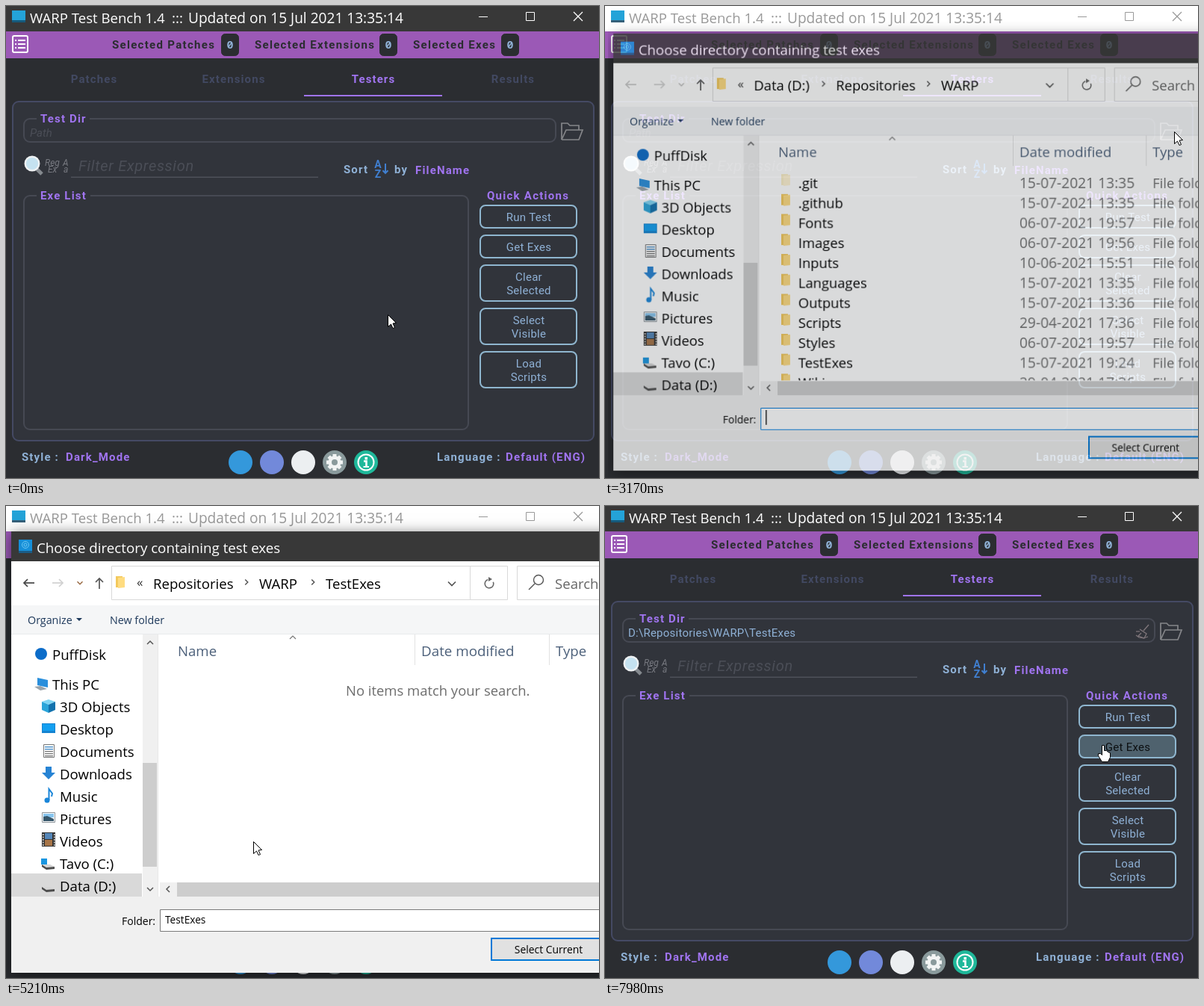
Animation, 794 px wide and 632 px high, one loop 8000 ms. Source, as an HTML page with a canvas:

```html
<!DOCTYPE html>
<html lang="en">
<head>
<meta charset="utf-8">
<title>Test bench</title>
<style>
html, body { margin: 0; width: 100%; height: 100%; overflow: hidden; background: #2b2d31; }
canvas { display: block; }
</style>
</head>
<body>
<canvas id="stage" width="794" height="632"></canvas>
<script>
const stage = document.getElementById('stage').getContext('2d');
const sheet = document.createElement('canvas');
sheet.width = 900;
sheet.height = 680;
const sheetCtx = sheet.getContext('2d');
let ctx = stage;

const LOOP = 8000, FIRST = 1130, STEP = 126.85;
const PURPLE = '#a074f0', BLUE = '#8fb1d6', EDGE = '#464953', PANEL = '#31343b', BODY = '#2b2d31';
const ACCENT = '#0078d7', GREY = '#cdcdcd';

// ---- drawing helpers; text is placed by the middle of its capitals ----
function text(s, x, y, color, font, size, spacing = 0, align = 'left') {
  ctx.font = font.replace('#', size + 'px');
  ctx.letterSpacing = spacing + 'px';
  ctx.textAlign = align;
  ctx.fillStyle = color;
  ctx.fillText(s, x, y + size * 0.36);
}
const ui = (s, x, y, color = '#000', size = 18.6, align) =>
  text(s, x, y, color, '# "Open Sans", sans-serif', size, 0, align);
const bold = (s, x, y, color = PURPLE, spacing = 1.15, align) =>
  text(s, x, y, color, 'bold # Roboto, sans-serif', 15, spacing, align);
const plain = (s, x, y, color = BLUE, align) =>
  text(s, x, y, color, '# Roboto, sans-serif', 15, 0.25, align);
const italic = (s, x, y, color, size, spacing = 0) =>
  text(s, x, y, color, 'italic # Roboto, sans-serif', size, spacing);

function rect(x, y, w, h, fill) {
  ctx.fillStyle = fill;
  ctx.fillRect(x, y, w, h);
}
function box(x, y, w, h, stroke, width = 1, radius = 0, fill) {
  ctx.beginPath();
  ctx.roundRect(x + width / 2, y + width / 2, w - width, h - width, radius);
  if (fill) { ctx.fillStyle = fill; ctx.fill(); }
  ctx.strokeStyle = stroke;
  ctx.lineWidth = width;
  ctx.stroke();
}
function trace(points) {
  ctx.beginPath();
  for (let i = 0; i < points.length; i += 2) ctx.lineTo(points[i], points[i + 1]);
}
function line(color, width, ...points) {
  trace(points);
  ctx.strokeStyle = color;
  ctx.lineWidth = width;
  ctx.stroke();
}
function shape(fill, ...points) {
  trace(points);
  ctx.closePath();
  ctx.fillStyle = fill;
  ctx.fill();
}
function disc(x, y, r, fill) {
  ctx.beginPath();
  ctx.arc(x, y, r, 0, 7);
  ctx.fillStyle = fill;
  ctx.fill();
}
function ring(x, y, r, color, width, from = 0, to = 7) {
  ctx.beginPath();
  ctx.arc(x, y, r, from, to);
  ctx.strokeStyle = color;
  ctx.lineWidth = width;
  ctx.stroke();
}
// Chevron pointing along (dx, dy)
function chevron(x, y, dx, dy, color, r = 4, width = 1.5) {
  line(color, width, x - dx * r / 2 - dy * r, y - dy * r / 2 - dx * r, x + dx * r / 2, y + dy * r / 2,
    x - dx * r / 2 + dy * r, y - dy * r / 2 + dx * r);
}
function arrow(x, y, dx, dy, color) {
  line(color, 1.7, x - dx * 7, y - dy * 7, x + dx * 7, y + dy * 7);
  chevron(x + dx * 4.5, y + dy * 4.5, dx, dy, color, 5, 1.7);
}

// ---- main window ----
const BUTTONS = [
  [266, 32, 'Run Test'], [306, 32, 'Get Exes'], [346, 50, 'Clear', 'Selected'],
  [404, 50, 'Select', 'Visible'], [462, 50, 'Load', 'Scripts']
];
const overButton = (p, [y, h]) => p.x >= 634 && p.x < 765 && p.y >= y && p.y < y + h;

function titleBar(active) {
  const ink = active ? '#fff' : '#999';
  rect(0, 0, 794, 34, active ? '#383838' : '#fff');
  rect(8, 6, 18, 13, '#24a3d8');
  rect(8, 19, 18, 3, active ? '#165a7c' : '#35607a');
  ui('WARP Test Bench 1.4', 32, 16, ink, 18.6);
  ui(':::', 222, 16, ink);
  ui('Updated on 15 Jul 2021 13:35:14', 244, 16, ink, 19.1);
  line(ink, 1, 633, 14.5, 645, 14.5);
  box(696, 8, 12, 12, ink);
  line(ink, 1.2, 760, 8, 772, 20);
  line(ink, 1.2, 772, 8, 760, 20);
}

function fieldset(x, y, w, h, legend, gap) {
  box(x, y, w, h, EDGE, 2, 8);
  rect(41, y - 1, gap, 4, PANEL);
  bold(legend, 46, y + 1);
}

function footerIcons() {
  ['#3498db', '#7289da', '#eceff1', '#8a9a9c', '#1fb89a'].forEach((c, i) => disc(314 + i * 42, 611, 16, c));
  for (let a = 0; a < 8; a++) {
    const c = Math.cos(a * Math.PI / 4), s = Math.sin(a * Math.PI / 4);
    line('#f2f4f4', 5, 440 + c * 6, 611 + s * 6, 440 + c * 11, 611 + s * 11);
  }
  disc(440, 611, 8.5, '#f2f4f4');
  disc(440, 611, 4, '#8a9a9c');
  ring(482, 611, 10.5, '#fff', 2);
  rect(480.5, 604, 3.5, 3.5, '#fff');
  line('#fff', 2.6, 479, 609.5, 482.5, 609.5, 482.5, 617);
  line('#fff', 2, 478.5, 617, 486, 617);
}

function mainWindow(active, filled, pointer) {
  rect(0, 0, 794, 632, BODY);
  titleBar(active);

  rect(0, 34, 794, 36, '#9b59b6');
  box(8, 39, 22, 24, '#fff', 2, 2);
  for (const y of [46, 51, 56]) {
    rect(12, y - 1, 2, 2, '#fff');
    rect(16, y - 1, 10, 2, '#fff');
  }
  [['Selected Patches', 142, 288], ['Selected Extensions', 333, 500], ['Selected Exes', 545, 663]]
    .forEach(([label, x, badge]) => {
      bold(label, x, 52, BODY, 1.3);
      box(badge, 37, 24, 30, BODY, 1, 5, BODY);
      text('0', badge + 12, 52, BLUE, 'bold # "Noto Sans Mono", monospace', 15, 0, 'center');
    });

  ['Patches', 'Extensions', 'Testers', 'Results'].forEach((tab, i) =>
    bold(tab, 118 + i * 187, 98, i === 2 ? PURPLE : '#424962', 1.1, 'center'));
  rect(399, 119, 185, 2, PURPLE);

  box(8, 127, 780, 456, '#454a64', 2, 8, PANEL);

  fieldset(23, 150, 714, 33, 'Test Dir', 71);
  if (filled) {
    plain('D:\\Repositories\\WARP\\TestExes', 31, 170);
    line('#80777c', 1.3, 728, 159, 721, 167);
    line('#80777c', 1.3, 716, 165, 725, 171, 722, 177, 714, 174, 718, 170);
    line('#80777c', 1.2, 711, 168, 716, 168);
    line('#80777c', 1.2, 711, 173, 715, 176, 721, 177, 727, 175);
  } else {
    italic('Path', 32, 170, '#4b4e57', 15);
  }
  line('#85868a', 1.7, 744, 179, 744, 157, 752, 157, 755, 160, 767, 160, 767, 166);
  line('#85868a', 1.7, 744, 179, 750, 166, 772, 166, 767, 179, 744, 179);

  line('#858a8f', 5, 40, 217, 48, 225);
  disc(35, 211, 10.5, '#eef1f3');
  disc(35, 211, 8, '#c5e2f0');
  const dim = '#777980';
  italic('Reg', 52, 210, dim, 12);
  italic('Ex', 56, 219, dim, 12);
  italic('A', 76, 210, dim, 12);
  italic('a', 77, 219, dim, 12);
  italic('Filter Expression', 97, 214, '#4b4e57', 20, 0.7);
  rect(87, 228.5, 331, 1.5, '#4e515a');

  bold('Sort', 452, 219, BLUE);
  const sort = '#407fd0';
  text('A', 498, 212, sort, 'bold # Roboto, sans-serif', 14, 0, 'center');
  text('Z', 498, 225, sort, 'bold # Roboto, sans-serif', 14, 0, 'center');
  line(sort, 2, 508, 211, 508, 223);
  chevron(508, 222, 0, 1, sort, 3.5, 2);
  bold('by', 520, 219, BLUE);
  bold('FileName', 548, 220);

  fieldset(23, 253, 597, 315, 'Exe List', 72);

  bold('Quick Actions', 644, 254, PURPLE, 1.25);
  for (const b of BUTTONS) {
    const [y, h, ...rows] = b, over = pointer && overButton(pointer, b);
    box(634, y, 131, h, '#8fb6cf', 2, 7, over ? '#4f626e' : PANEL);
    rows.forEach((row, i) =>
      plain(row, 700, y + h / 2 + 1 + (i - (rows.length - 1) / 2) * 18, over ? '#0d1012' : BLUE, 'center'));
  }

  bold('Style :', 21, 604, BLUE);
  bold('Dark_Mode', 80, 604);
  bold('Language :', 577, 604, BLUE);
  bold('Default (ENG)', 669, 604);
  footerIcons();
}

// ---- folder chooser ----
const FOLDERS = [
  ['.git', '15-07-2021 13:35'], ['.github', '15-07-2021 13:35'], ['Fonts', '06-07-2021 19:57'],
  ['Images', '06-07-2021 19:56'], ['Inputs', '10-06-2021 15:51'], ['Languages', '15-07-2021 13:35'],
  ['Outputs', '15-07-2021 13:36'], ['Scripts', '29-04-2021 17:36'], ['Styles', '06-07-2021 19:57'],
  ['TestExes', '15-07-2021 19:24'], ['Wiki', '29-04-2021 17:36']
];
function screenIcon(x, y) {
  rect(x, y, 18, 13, '#1583d0');
  rect(x + 1, y + 1, 16, 9, '#139ff0');
}
function driveIcon(y) {
  shape('#d5d5d5', 49, y + 1, 59, y + 1, 65, y + 4, 54, y + 5);
  shape('#4d4d4d', 48, y + 1, 54, y + 5, 65, y + 4, 65, y + 7, 54, y + 8, 48, y + 4);
}
const PLACES = [
  ['PuffDisk', y => disc(47, y - 1, 8, '#0b6cc9')],
  ['This PC', y => {
    shape('#2a8fdc', 42, y - 9, 56, y - 6, 56, y + 4, 42, y + 1);
    shape('#9aa4ab', 38, y + 3, 46, y + 2, 55, y + 6, 46, y + 8);
  }],
  ['3D Objects', y => {
    shape('#7fd6f5', 48, y - 7, 57, y - 10, 66, y - 7, 57, y - 3);
    shape('#2aa5da', 48, y - 7, 57, y - 3, 57, y + 8, 48, y + 4);
    shape('#1272ae', 66, y - 7, 57, y - 3, 57, y + 8, 66, y + 4);
  }],
  ['Desktop', y => screenIcon(48, y - 8)],
  ['Documents', y => {
    box(50, y - 10, 15, 18, '#777', 1, 0, '#fff');
    for (let i = 0; i < 5; i++) rect(52, y - 7 + i * 3, 11, 1.3, i < 2 ? '#3b86c4' : '#777');
  }],
  ['Downloads', y => {
    shape('#2683d4', 53, y - 10, 61, y - 10, 61, y - 2, 66, y - 2, 57, y + 7, 48, y - 2, 53, y - 2);
  }],
  ['Music', y => {
    disc(55, y + 5, 3.5, '#1a86d9');
    line('#1a86d9', 2, 57.5, y + 5, 57.5, y - 10, 62, y - 4, 61, y);
  }],
  ['Pictures', y => {
    box(48, y - 9, 18, 14, '#8b9399', 1, 0, '#fff');
    rect(50, y - 7, 14, 5, '#88c5ee');
    shape('#36566a', 50, y - 3, 55, y - 4, 64, y, 64, y + 3, 50, y + 3);
  }],
  ['Videos', y => {
    rect(48, y - 12, 18, 19, '#333');
    rect(52, y - 11, 10, 8, '#5486b8');
    rect(52, y - 2, 10, 8, '#a77548');
    for (let i = 0; i < 5; i++) for (const x of [49, 64]) rect(x, y - 10 + i * 3.5, 1.5, 2, '#ddd');
  }],
  ['Tavo (C:)', y => { driveIcon(y); rect(47, y - 7, 8, 8, '#1a96e0'); }],
  ['Data (D:)', driveIcon]
];

function folderIcon(x, y, pale) {
  rect(x, y, 9, 15, pale ? '#fbeec6' : '#f3c95c');
  shape(pale ? '#fff3d2' : '#ffdc80', x + 3, y + 2, x + 12, y + 1, x + 12, y + 15, x + 3, y + 16);
}

function addressBar(tick) {
  const inside = tick >= 27;
  arrow(31, 103, -1, 0, inside ? '#444' : '#c8c8c8');
  arrow(69, 103, 1, 0, '#d0d0d0');
  chevron(99, 103, 0, 1, inside ? '#9a6b45' : '#c0c0c0', 3.5);
  arrow(125, 104, 0, -1, '#555');
  box(141, 80, 481, 46, '#d9d9d9');
  box(621, 80, 51, 46, '#d9d9d9');
  box(684, 80, 176, 46, '#d9d9d9');
  folderIcon(147, 94);
  ui('«', 175, 102, '#333', 17);
  const crumbs = tick < 18
    ? [['Data (D:)', 197, 291], ['Repositories', 308, 433], ['WARP', 450]]
    : [['Repositories', 197, 322], ['WARP', 339, 411], ...(inside ? [['TestExes', 428]] : [])];
  for (const [name, x, next] of crumbs) {
    ui(name, x, 104);
    if (next) chevron(next, 102, 1, 0, '#555', 3.5);
  }
  chevron(597, 104, 0, 1, '#555', 5, 1.7);
  ring(647, 104, 5.8, '#666', 1.6, -0.4, 4.4);
  shape('#666', 646, 95, 651, 98, 646, 101);
  ring(713, 99, 6.5, '#555', 1.4);
  line('#555', 1.4, 708, 104, 700, 112);
  ui('Search TestExes', 735, 104, '#666');
}

function sidebar() {
  rect(7, 492, 175, 31, '#d9d9d9');
  PLACES.forEach(([name, icon], i) => {
    const y = 209 + i * 30 - (i ? 0 : 10);
    icon(y);
    ui(name, i < 2 ? 62 : 72, y);
  });
  rect(183, 172, 20, 351, '#f0f0f0');
  rect(183, 344, 19, 139, GREY);
  chevron(193, 183, 0, -1, '#555');
  chevron(193, 513, 0, 1, '#555');
  rect(203, 172, 1, 351, '#e8e8e8');
}

function fileList(tick) {
  const head = '#4c607a';
  chevron(384, 176, 0, -1, '#777', 4, 1.2);
  ui('Name', 230, 194, head);
  ui('Date modified', 556, 194, head, 18.8);
  ui('Type', 736, 194, head);
  rect(547, 172, 1, 41, '#e2e2e2');
  rect(727, 172, 1, 41, '#e2e2e2');
  if (tick >= 27) {
    if (tick >= 28) ui('No items match your search.', 455, 247, '#6d6d6d', 18.45);
  } else {
    ctx.save();
    ctx.beginPath();
    ctx.rect(205, 213, 690, 290);
    ctx.clip();
    if (tick === 24) rect(226, 409, 634, 28, '#e5f3ff');
    if (tick >= 25) rect(226, 465, 634, 27, '#cce8ff');
    FOLDERS.forEach(([name, date], i) => {
      const y = 236 + i * 27;
      folderIcon(234, y - 12, i === 0);
      ui(name, 257, y);
      ui(date, 556, y, '#6d6d6d', 19.4);
      ui('File folder', 736, y, '#6d6d6d');
    });
    ctx.restore();
  }
  rect(206, 504, 654, 19, '#f0f0f0');
  rect(229, 504, 600, 19, GREY);
  chevron(217, 513, -1, 0, '#555');
}

function chooser(tick) {
  ctx.clearRect(0, 0, 900, 680);
  ctx.shadowColor = 'rgba(0,0,0,.55)';
  ctx.shadowBlur = 18;
  ctx.shadowOffsetY = 3;
  rect(7, 34, 866, 591, '#f0f0f0');
  ctx.shadowColor = 'transparent';

  rect(7, 34, 866, 40, '#383838');
  rect(17, 45, 18, 15, '#168fd8');
  ring(26, 52, 4.5, '#6cc6f2', 1);
  ring(26, 52, 2, '#6cc6f2', 1);
  rect(17, 60, 18, 3, '#1b5d87');
  ui('Choose directory containing test exes', 41, 56, '#fff', 18.75);

  rect(7, 74, 866, 449, '#fff');
  addressBar(tick);
  rect(7, 133, 866, 39, '#f5f6f7');
  rect(7, 171, 866, 1, '#e8eaec');
  ui('Organize', 29, 153, '#1e395b', 14.3);
  shape('#1e395b', 94, 150, 102, 150, 98, 154);
  ui('New folder', 139, 153, '#1e395b', 14.3);
  sidebar();
  fileList(tick);

  ui('Folder:', 155, 556, '#000', 14);
  box(206, 540, 654, 30, tick < 26 ? ACCENT : '#7a7a7a', 1, 0, '#fff');
  if (tick < 21) rect(213, 543, 1.3, 20, '#000');
  if (tick >= 25) ui('TestExes', 213, 554, '#000', 13.7);
  box(649, 578, 153, 31, ACCENT, 2, 0, tick >= 40 ? '#cce4f7' : tick >= 39 ? '#e5f1fb' : '#e1e1e1');
  ui('Select Current', 726.5, 594, '#000', 13.9, 'center');
}

// ---- pointer: tick, x, y ----
const PATH = [
  [0, 511, 413], [2, 503, 385], [6, 622, 319], [10, 767, 148], [12, 762, 168], [18, 762, 168],
  [24, 314, 433], [25, 308, 475], [32, 308, 475], [33, 331, 449], [39, 646, 585], [42, 646, 585],
  [44, 378, 489], [51, 557, 336], [55, 667, 320]
];
function pointerAt(tick) {
  const i = Math.max(1, PATH.findIndex(p => p[0] >= tick));
  const [k0, x0, y0] = PATH[i - 1], [k1, x1, y1] = PATH[i];
  const u = (tick - k0) / (k1 - k0), e = u * u * (3 - 2 * u);
  return { x: x0 + (x1 - x0) * e, y: y0 + (y1 - y0) * e };
}
function drawPointer({ x, y }, hand) {
  ctx.save();
  ctx.translate(Math.round(x) + 0.5, Math.round(y) + 0.5);
  if (hand) {
    shape('#fff', -2, 0, 1, 0, 1, 7, 4, 7, 6, 9, 9, 10, 9, 16, 6, 22, -2, 22, -7, 14, -7, 11, -4, 11, -2, 13);
  } else {
    shape('#fff', 0, 0, 0, 16, 4, 12.5, 6.5, 18, 9, 17, 6.5, 11.5, 11, 11);
  }
  ctx.strokeStyle = '#000';
  ctx.lineWidth = 1;
  ctx.stroke();
  ctx.restore();
}

// Opacity and scale of the chooser as it opens and closes
function chooserState(tick) {
  if (tick < 16 || tick > 42) return null;
  return { 16: [0.35, 0.96], 17: [0.82, 0.9904], 41: [0.7, 0.987], 42: [0.3, 0.9684] }[tick] || [1, 1];
}

function draw(t) {
  const tick = t < FIRST ? 0 : Math.min(55, 1 + Math.floor((t - FIRST) / STEP));
  const pointer = pointerAt(tick), state = chooserState(tick);
  const free = tick < 12 || tick > 42;
  ctx = stage;
  mainWindow(tick < 12 || tick > 40, tick > 40, free && pointer);
  if (state) {
    const [alpha, scale] = state;
    ctx = sheetCtx;
    chooser(tick);
    ctx = stage;
    ctx.save();
    ctx.globalAlpha = alpha;
    ctx.translate(440, 329.5);
    ctx.scale(scale, scale);
    ctx.drawImage(sheet, -440, -329.5);
    ctx.restore();
  }
  drawPointer(pointer, free && BUTTONS.some(b => overButton(pointer, b)));
}

const start = performance.now();
function loop() {
  draw((performance.now() - start) % LOOP);
  requestAnimationFrame(loop);
}
loop();
</script>
</body>
</html>
```
